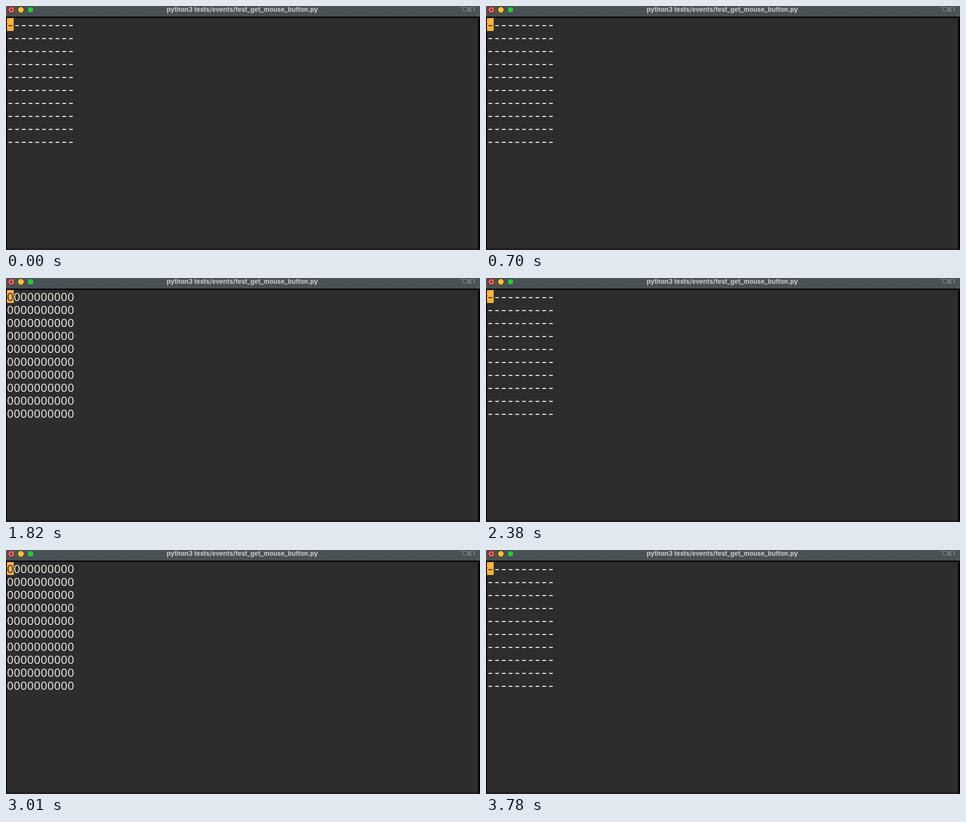
Write an HTML page with a canvas that moves like this. It is 986 px wide and 508 px high and loops after 3.85 s.

```html
<!DOCTYPE html>
<html lang="en">
<head>
<meta charset="utf-8">
<title>Mouse button test</title>
<style>
  html, body { margin: 0; width: 100%; height: 100%; overflow: hidden; background: #000; }
  canvas { display: block; }
</style>
</head>
<body>
<canvas id="stage" width="986" height="508"></canvas>
<script>
const ctx = document.getElementById('stage').getContext('2d');
const LOOP = 3850;
const CELL = { x: 2, y: 25, w: 14, h: 27, count: 10 };

// Times at which the mouse button goes down and up.
const PRESSES = [[210, 630], [1260, 1890], [2450, 3570]];

const STATES = {
  up:   { char: '-', font: '500 24px Inter, sans-serif', dy: 15.4, cursor: '#ffb431', ring: '#30291d' },
  down: { char: '0', font: '24px "Noto Sans", "Open Sans", sans-serif', dy: 14.3, cursor: '#ffb340', ring: '#454a42' }
};

function rect(x, y, w, h, color) {
  ctx.fillStyle = color;
  ctx.fillRect(x, y, w, h);
}

function disc(x, y, r, color) {
  ctx.fillStyle = color;
  ctx.beginPath();
  ctx.arc(x, y, r, 0, Math.PI * 2);
  ctx.fill();
}

// Draws a glyph with the middle of its ink at (x, y).
function glyph(char, x, y, font, color) {
  ctx.font = font;
  ctx.fillStyle = color;
  ctx.textAlign = 'left';
  const m = ctx.measureText(char);
  const left = x - (m.actualBoundingBoxRight - m.actualBoundingBoxLeft) / 2;
  const base = y + (m.actualBoundingBoxAscent - m.actualBoundingBoxDescent) / 2;
  ctx.fillText(char, left, base);
}

function drawWindow(ring) {
  rect(0, 0, 986, 508, '#050505');
  const bar = ctx.createLinearGradient(0, 0, 0, 22);
  bar.addColorStop(0, '#4c5458');
  bar.addColorStop(1, '#485054');
  rect(0, 0, 986, 22, bar);
  rect(2, 25, 980, 479, '#2d2d2d');
  rect(2, 504, 980, 4, '#231e20');

  ['#ff5f57', '#febc2e', '#28c840'].forEach((color, i) => {
    const x = 11 + 20 * i;
    disc(x, 8, 7, ring);
    disc(x, 8, 6, color);
  });
  disc(11, 8, 2, '#7d110c');

  ctx.font = 'bold 13.2px Inter, sans-serif';
  ctx.fillStyle = '#c8cbcc';
  ctx.textAlign = 'center';
  ctx.fillText('python3 tests/events/test_get_mouse_button.py', 491.5, 12);

  const keyFont = '600 13px Inter, "DejaVu Sans", sans-serif';
  [['⌥', 951], ['⌘', 963.5], ['1', 973]].forEach(([char, x]) => glyph(char, x, 7, keyFont, '#858b8e'));
}

function drawGrid(state) {
  rect(CELL.x, CELL.y, CELL.w, CELL.h, state.cursor);
  for (let row = 0; row < CELL.count; row++) {
    for (let col = 0; col < CELL.count; col++) {
      const x = CELL.x + (col + 0.5) * CELL.w;
      const y = CELL.y + row * CELL.h + state.dy;
      glyph(state.char, x, y, state.font, row || col ? '#e4e3d9' : '#2d2d2d');
    }
  }
}

let shown;
function frame(now) {
  const t = now % LOOP;
  const pressed = PRESSES.some(([down, up]) => t >= down && t < up);
  const state = pressed ? STATES.down : STATES.up;
  if (state !== shown) {
    drawWindow(state.ring);
    drawGrid(state);
    shown = state;
  }
  requestAnimationFrame(frame);
}
frame(performance.now());
</script>
</body>
</html>
```
